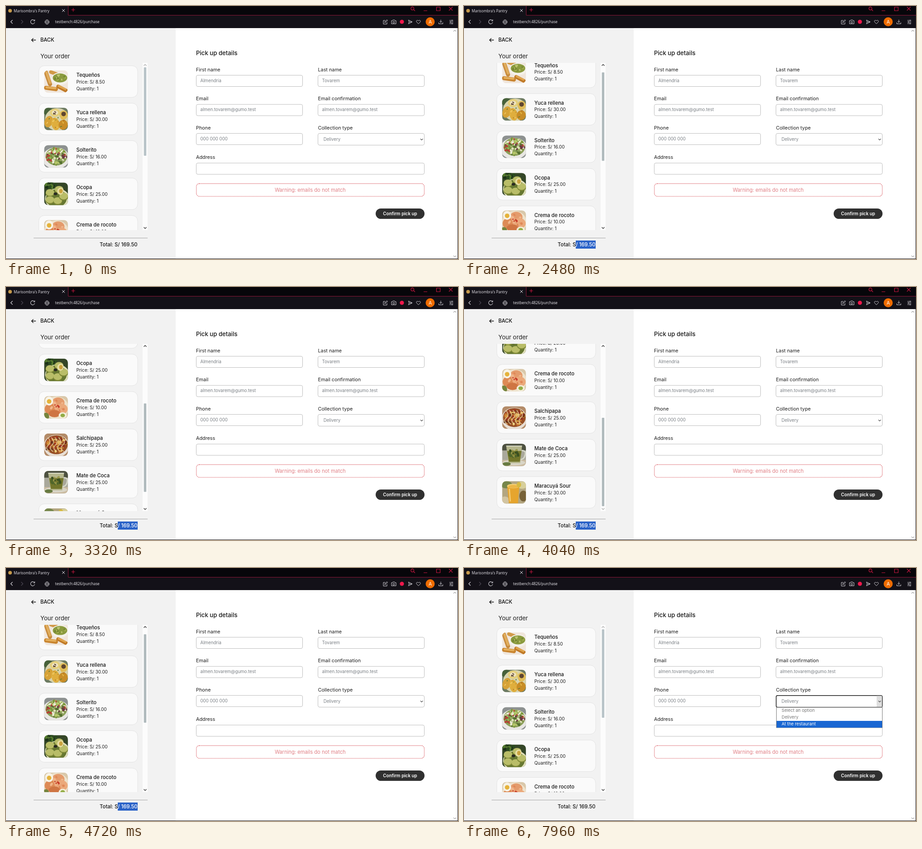
Animation of 999x561 px, one loop 8 s. Source, as an HTML page:

```html
<!DOCTYPE html>
<html lang="en">
<head>
<meta charset="utf-8">
<title>Checkout</title>
<style>
  html, body { margin: 0; width: 100%; height: 100%; overflow: hidden; background: #fff; }
  svg { display: block; width: 999px; height: 561px; font-family: Inter, "Open Sans", sans-serif; }
  .bar { font-family: "Open Sans", "Noto Sans", sans-serif; }
  text { white-space: pre; }
</style>
</head>
<body>
<svg id="stage" viewBox="0 0 999 561"></svg>
<script>
const text = (x, y, size, str, fill = '#1c1c1c', more = '') =>
  `<text x="${x}" y="${y}" font-size="${size}" fill="${fill}" ${more}>${str}</text>`;
const rect = (x, y, w, h, fill, more = '') =>
  `<rect x="${x}" y="${y}" width="${w}" height="${h}" fill="${fill}" ${more}/>`;
const oval = (x, y, rx, ry, fill, turn = 0) =>
  `<ellipse cx="${x}" cy="${y}" rx="${rx}" ry="${ry}" fill="${fill}" transform="rotate(${turn} ${x} ${y})"/>`;
const line = (d, stroke, width = 1, more = '') =>
  `<path d="${d}" fill="none" stroke="${stroke}" stroke-width="${width}" ${more}/>`;
const stick = (x1, y1, x2, y2, color, width) =>
  line(`M${x1} ${y1}L${x2} ${y2}`, color, width, 'stroke-linecap="round"');

let seed = 7;
const rand = () => (seed = seed * 16807 % 2147483647) / 2147483647;

// Small random pieces of food inside an ellipse
function scatter(n, cx, cy, rx, ry, size, colors) {
  let out = '';
  for (let i = 0; i < n; i++) {
    const a = rand() * 6.283, r = Math.sqrt(rand());
    out += oval(cx + rx * r * Math.cos(a), cy + ry * r * Math.sin(a),
      size * (.6 + rand()), size * (.4 + rand() * .6), colors[i % colors.length], rand() * 180);
  }
  return out;
}

// Each picture fills a box of 53 by 50
const pictures = [
  () => rect(0, 0, 53, 50, '#f0e6dc') + stick(4, 5, 13, 31, '#c78a3c', 9) + stick(5, 5, 13, 28, '#e0ad5d', 5)
    + stick(15, 4, 29, 9, '#d19a48', 8) + oval(35, 19, 19, 14, '#f4f1ea') + oval(35, 17, 16, 10, '#8b9b3e')
    + scatter(14, 35, 17, 12, 7, 2.5, ['#a5b152', '#728331', '#bdc36f'])
    + stick(4, 39, 26, 42, '#c9852f', 9) + stick(5, 38, 25, 40, '#e5b15e', 4)
    + stick(31, 36, 48, 45, '#c07a28', 8) + stick(32, 35, 47, 42, '#dfa54e', 4),
  () => rect(0, 0, 53, 50, '#6d7b62') + oval(8, 8, 12, 8, '#47613a') + oval(29, 26, 27, 25, '#d8d3ad')
    + oval(24, 11, 11, 9, '#e4cf79') + oval(24, 11, 7, 5, '#eee3c0') + oval(43, 16, 9, 10, '#e0bd58')
    + oval(43, 14, 5, 5, '#5f4630') + oval(10, 31, 9, 13, '#d6a237', 18) + oval(25, 36, 9, 14, '#dfae3d', -12)
    + oval(42, 38, 10, 11, '#c88d27', 10) + scatter(16, 25, 34, 22, 13, 1.7, ['#f0ca64', '#b87c22', '#5d7b31', '#e4b746'])
    + scatter(5, 24, 11, 4, 3, 1.5, ['#583f2c']),
  () => rect(0, 0, 53, 50, '#8d9190') + oval(26, 29, 30, 24, '#e9e7e4') + oval(27, 25, 24, 20, '#8da05b')
    + scatter(90, 27, 25, 22, 18, 2.8, ['#b6c76a', '#eeeadb', '#55702f', '#9eb954', '#6d3346', '#dedfbb', '#b74435', '#7b963e']),
  () => rect(0, 0, 53, 50, '#344627') + scatter(20, 14, 5, 16, 8, 4, ['#294c1d', '#547a2e', '#1a3016'])
    + oval(29, 36, 27, 23, '#e0dfbb') + oval(27, 35, 23, 20, '#667731')
    + [[13, 23], [33, 16], [13, 39], [30, 41], [43, 31]].map(([x, y]) =>
      oval(x, y + 1, 10, 8, '#7c8634') + oval(x, y - 1, 9.5, 7.5, '#b9bd68')).join('')
    + oval(36, 19, 7, 8, '#e7dda2', 20) + oval(37, 19, 4, 5, '#caa33e') + oval(25, 25, 4, 3, '#292a21'),
  () => rect(0, 0, 53, 50, '#d9c8aa') + oval(27, 26, 27, 25, '#eee2cc') + oval(31, 15, 14, 12, '#e49b6c')
    + oval(16, 29, 15, 13, '#dd8a55') + oval(38, 29, 14, 12, '#eba97b') + oval(23, 39, 13, 8, '#cf7543')
    + scatter(14, 28, 25, 18, 15, 3, ['#f0b68b', '#df8857', '#e89c6e']) + oval(11, 11, 9, 10, '#f7f3e7')
    + oval(11, 12, 5, 5, '#e5b33b') + oval(41, 43, 9, 7, '#f3eed9') + oval(41, 43, 5, 4, '#93ad46')
    + scatter(6, 28, 22, 7, 4, 2, ['#c63626']) + oval(4, 45, 7, 8, '#75843d'),
  () => rect(0, 0, 53, 50, '#b38b68') + oval(27, 28, 28, 25, '#e8dfd5') + oval(27, 25, 25, 21, '#985025')
    + scatter(65, 27, 25, 23, 19, 3, ['#d69a3d', '#8b321f', '#c87632', '#eac66e', '#a43a26', '#66321d'])
    + [8, 16, 24, 32, 40].map(x => line(`M${x} 9q9 10 1 17t3 14`, '#efdda4', 1.4)).join(''),
  () => rect(0, 0, 53, 50, '#a9a89b') + rect(0, 0, 53, 15, '#4d5140') + rect(0, 36, 53, 14, '#cbbba0')
    + line('M43 15q13 0 6 15q-3 5-9 5', '#d6d8c9', 3) + oval(26, 42, 25, 6, '#d9d5c7')
    + '<path d="M9 5H44L40 43H14Z" fill="#b6b78e"/><path d="M11 16H43L39 40H15Z" fill="#73762b"/>'
    + scatter(18, 27, 22, 12, 8, 3, ['#3c5121', '#989749', '#50662a']) + line('M9 5H44', '#eceee0', 1.5)
    + oval(10, 45, 9, 4, '#687b42'),
  () => rect(0, 0, 53, 50, '#b3a681') + oval(9, 8, 13, 8, '#76864b') + oval(44, 9, 12, 8, '#d7cf9b')
    + oval(47, 33, 9, 12, '#776238') + oval(6, 43, 10, 9, '#d2c4a1')
    + '<path d="M11 10H38L35 49H15Z" fill="#e6a52e"/>' + oval(24.5, 11, 13.5, 5, '#f3ce72')
    + oval(24.5, 12, 11, 3.5, '#edb747') + line('M16 17L18 45', '#f5cf79', 2.5) + oval(37, 8, 5, 6, '#d5b943')
];

const dishes = [['Tequeños', '8.50'], ['Yuca rellena', '30.00'], ['Solterito', '16.00'], ['Ocopa', '25.00'],
  ['Crema de rocoto', '10.00'], ['Salchipapa', '25.00'], ['Mate de Coca', '25.00'], ['Maracuyá Sour', '30.00']];

const card = ([name, price], i) => `<g transform="translate(72 ${132 + i * 83})">`
  + rect(.5, .5, 218.5, 70, '#fafafa', 'rx="12" stroke="#e3e3e3"')
  + `<g transform="translate(12.3 10.4)" clip-path="url(#photo)">${pictures[i]()}</g>`
  + text(83.5, 24.8, 11.1, name, '#151515', 'font-weight="550"')
  + text(83.5, 39.6, 9.9, `Price: S/ ${price}`) + text(83.5, 54.6, 9.9, 'Quantity: 1') + '</g>';

const box = (x, y, w, value = '', h = 25) =>
  rect(x + .5, y + .5, w - 1, h, '#fff', 'rx="3.5" stroke="#bdbdbd"') + text(x + 9.5, y + 15.6, 9.7, value, '#7a7f84');
const label = (x, y, str) => text(x, y, 10.8, str);
const arrow = (x, y, up, id) =>
  `<path id="${id}" d="M${x - 3} ${y + (up ? 1.5 : -1.5)}l3 ${up ? -3 : 3}l3 ${up ? 3 : -3}" fill="none" stroke="#b5b5b5" stroke-width="1.5"/>`;

const red = '#c3163f', pale = '#d5d3d9';
const browser = rect(0, 0, 999, 49, '#131118') + rect(137, 0, 862, 21, '#07060a')
  + line('M137.5 0V20.5H999', '#8d1838') + oval(9, 10.5, 4, 4, '#c69a4c')
  + `<g class="bar">${text(17, 13.5, 8.2, "Marisombra's Pantry", '#eceaf0') + text(108.5, 38.4, 8.3, 'testbench:4826/purchase', '#f0eef3')}</g>`
  + line('M124 7l6 6m0-6l-6 6', '#e4e2e8') + line('M144.5 8.5h8m-4-4v8', red, 1.2)
  + line('M901 8l3 3M895 5.5a3.3 3.3 0 1 0 6.6 0a3.3 3.3 0 1 0-6.6 0M923 10.5h8M951.5 2.5h8v8h-8zM979 2l8 8m0-8l-8 8', red, 1.2)
  + line('M14.5 31l-4 4l4 4', pale, 1.2) + line('M33.5 31l4 4l-4 4', '#4c4853', 1.2)
  + line('M62.5 32a4.6 4.6 0 1 0 1 4M63.5 30v3h-3', pale, 1.1)
  + line('M86 35.5a4.7 4.7 0 1 0 9.4 0a4.7 4.7 0 1 0-9.4 0h9.4M90.7 30.8c-3 3-3 6.500 0 9.400c3-3 3-6.400 0-9.400', pale, .9)
  + line('M838 32h-4v8h8v-4M837 37l1-3l4-3.500l1.500 1.500l-4 3.500zM852 32.500h2l1-1.500h4l1 1.500h2v7h-10zM855 36a2 2 0 1 0 4 0a2 2 0 1 0-4 0', pale)
  + oval(875, 35, 4.6, 4.6, '#f0184c')
  + line('M889.500 31l8.500 4.300l-8.500 4.300l1.500-4.300zM891 35.300h6M911.500 39.500l-4-4c-2-3 2-5.500 4-2.500c2-3 6-.5 4 2.500z', pale)
  + oval(937.5, 35, 10, 10, '#ef6c00') + text(937.5, 39, 10.5, 'A', '#fff', 'text-anchor="middle"')
  + line('M961 30.500v6m-2.500-2.500l2.500 2.500l2.500-2.500M956.500 36.500v3h9v-3M980 32h8.500M980 35.500h8.500M980 39h8.500M986 30.500v3M982.500 34v3M986 37.500v3', pale);

const total = color => text(290.5, 532.8, 11.3, 'Total: S/ 169.50', color, 'font-weight="550" text-anchor="end"');

const order = rect(0, 49, 375, 511, '#f2f2f2')
  + line('M66 75.500h-9.500m4-4l-4 4l4 4', '#111', 1.4) + text(76, 79.3, 11.2, 'BACK', '#111', 'font-weight="500"')
  + text(76, 115.8, 13.1, 'Your order')
  + `<g clip-path="url(#list)"><g id="cards">${dishes.map(card).join('')}</g></g>`
  + rect(302, 126, 11, 371, '#fcfcfc') + rect(304.7, 136, 5.4, 196, '#b8c4c8', 'id="thumb" rx="1"')
  + arrow(307.5, 131, true, 'up') + arrow(307.5, 492, false, 'down')
  + line('M61 514.500H313', '#a5a5a5') + total('#151515')
  + `<g clip-path="url(#marked)">${rect(247, 520, 44, 18, '#2b63c8') + total('#fff')}</g>`;

const form = text(420, 108.6, 13.2, 'Pick up details', '#151515', 'font-weight="450"')
  + label(420, 144.8, 'First name') + box(420, 153, 236, 'Almendria')
  + label(689.5, 144.8, 'Last name') + box(689, 153, 236, 'Tovarem')
  + label(420, 209.4, 'Email') + box(420, 217.7, 236, 'almen.tovarem@gumo.test')
  + label(689.5, 209.4, 'Email confirmation') + box(689, 217.7, 236, 'almen.tovarem@gumo.test')
  + label(420, 273.6, 'Phone') + box(420, 282, 236, '000 000 000')
  + label(689.5, 273.6, 'Collection type') + box(689, 282, 236, '', 26)
  + text(701.7, 299, 9.7, 'Delivery', '#7a7f84') + line('M916 294.500l2.700 2.700l2.700-2.700', '#555', 1.3)
  + label(420, 339.4, 'Address') + box(420, 347.7, 505)
  + rect(420.7, 393.7, 503.8, 28.4, '#fff', 'rx="7" stroke="#d9575f" stroke-width="1.4" stroke-dasharray="1.5 1.5"')
  + text(672.3, 411.8, 11.2, 'Warning: emails do not match', '#e07f85', 'text-anchor="middle"')
  + rect(817, 449, 108, 23, '#303030', 'rx="11.5"')
  + text(871, 463.7, 9.8, 'Confirm pick up', '#fff', 'font-weight="600" text-anchor="middle"')
  + arrow(992, 55, true, 'pageUp') + arrow(992, 555, false, 'pageDown')
  + rect(998, 49, 1, 512, '#2a272c') + rect(0, 560, 999, 1, '#1d1b20');

const menu = `<g id="menu">${rect(690, 282.700, 234.500, 26, 'none', 'rx="3" stroke="#161616" stroke-width="1.4"')
  + rect(912, 283.500, 11.800, 24.500, '#dedede') + line('M916 294.500l2.700 2.700l2.700-2.700', '#555', 1.3)
  + rect(690.5, 309, 234, 45, '#fff', 'stroke="#777"') + rect(691, 324, 233, 15, '#1967d2', 'id="pick"')
  + ['Select an option', 'Delivery', 'At the restaurant'].map((s, i) =>
    text(702, 319.4 + i * 15, 9.6, s, '#777', 'class="option"')).join('')}</g>`;

stage.innerHTML = `<defs><clipPath id="list">${rect(60, 126, 240, 371, '#000')}</clipPath>
  <clipPath id="photo">${rect(0, 0, 52.5, 50, '#000', 'rx="9"')}</clipPath>
  <clipPath id="marked">${rect(247, 519, 0, 20, '#000', 'id="mark"')}</clipPath></defs>`
  + rect(0, 0, 999, 561, '#fff') + browser + order + form + menu;

const $ = id => document.getElementById(id);
const options = document.querySelectorAll('.option');

// Piecewise linear value through [time, value] points
function track(t, points) {
  for (let i = 1; i < points.length; i++) {
    const [t0, a] = points[i - 1], [t1, b] = points[i];
    if (t < t1) return a + (b - a) * Math.max(0, (t - t0) / (t1 - t0));
  }
  return points[points.length - 1][1];
}

const scrollPath = [[2320, 0], [2480, 21], [3000, 151.5], [3560, 293], [4050, 293], [4720, 21], [4840, 0]];

function draw() {
  const t = performance.now() % 8000;
  const scroll = track(t, scrollPath);
  $('cards').setAttribute('transform', `translate(0 ${-scroll})`);
  $('thumb').setAttribute('y', 136 + scroll * .526);
  $('thumb').setAttribute('fill', t > 1520 && t < 5000 ? '#b0babd' : '#b8c4c8');
  $('up').setAttribute('stroke', scroll > 0 ? '#444' : '#b5b5b5');
  $('down').setAttribute('stroke', scroll < 293 ? '#444' : '#b5b5b5');
  $('mark').setAttribute('width', t < 5200 ? track(t, [[720, 0], [960, 44]]) : 0);

  $('menu').style.display = t >= 7000 ? '' : 'none';
  const picked = t < 7600 ? 1 : 2;
  $('pick').setAttribute('y', 309 + picked * 15);
  options.forEach((o, i) => o.setAttribute('fill', i === picked ? '#fff' : '#777'));
  requestAnimationFrame(draw);
}
draw();
</script>
</body>
</html>
```
